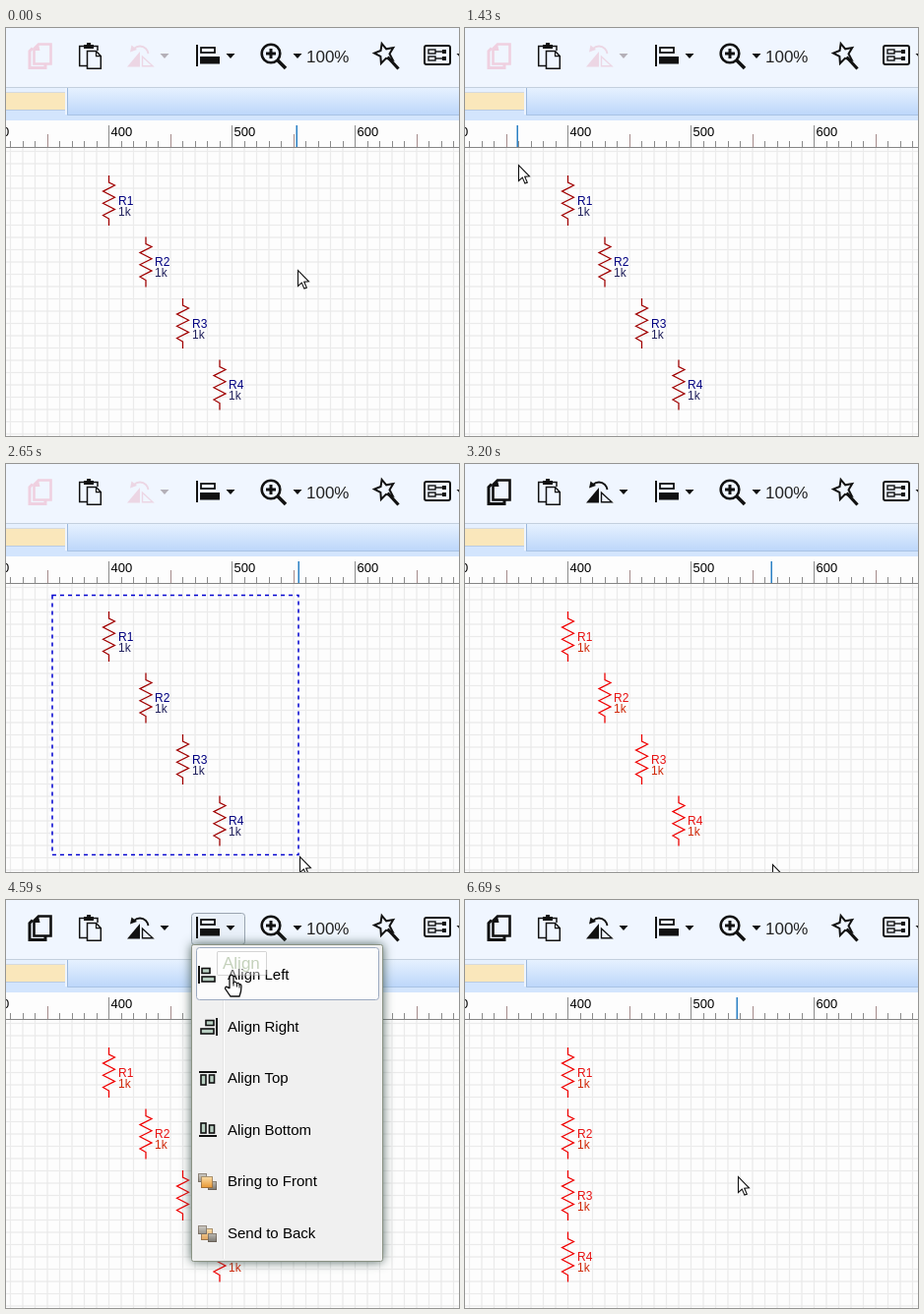
An HTML page with a canvas for the animation above (7.53 s loop, 460x415 px).

```html
<!DOCTYPE html>
<html lang="en">
<head>
<meta charset="utf-8">
<title>Aligning parts</title>
<style>
html, body { margin: 0; width: 100%; height: 100%; overflow: hidden; background: #fff; }
canvas { display: block; width: 460px; height: 415px; }
</style>
</head>
<body>
<canvas id="stage" width="460" height="415"></canvas>
<script>
const ctx = document.getElementById('stage').getContext('2d');
const LOOP = 7530, GRID = 12.5, ORIGIN = 104.5;
const SANS = '"Liberation Sans", Arial, sans-serif';

const SELECT = 3110, HOVER = 3970, OPEN = 4040, LEAVE = 4440, ALIGN = 5290;

const linear = u => u;
const smooth = u => u * u * (3 - 2 * u);
const out = p => u => 1 - (1 - u) ** p;

// Pointer moves: first step, last step, step count, target x and y, easing per axis
const moves = [
  [670, 1350, 10, 59, 143, smooth],
  [1430, 1510, 2, 48, 135, linear],
  [1660, 2340, 10, 242, 367, u => u * (0.8 + 0.2 * u)],
  [2420, 2800, 6, 312, 407, out(1.48)],
  [3430, 3970, 8, 216, 30, out(2), linear],
  [4440, 4740, 5, 230, 77, out(4)],
  [6300, 6690, 6, 277, 281, smooth]
];

function progress(t, start, end, n) {
  if (t < start) return 0;
  return Math.min(1, (Math.floor((t - start + 6) / (end - start) * (n - 1)) + 1) / n);
}

function pointerAt(t) {
  let x = 296, y = 246;
  for (const [start, end, n, tx, ty, easeX, easeY = easeX] of moves) {
    const u = progress(t, start, end, n);
    x += (tx - x) * easeX(u);
    y += (ty - y) * easeY(u);
  }
  return { x: Math.round(x), y: Math.round(y) };
}

function rect(x, y, w, h, color) {
  ctx.fillStyle = color;
  ctx.fillRect(x, y, w, h);
}

function frame(x, y, w, h, color, width = 1) {
  ctx.strokeStyle = color;
  ctx.lineWidth = width;
  ctx.strokeRect(x, y, w, h);
}

function path(points, { fill, stroke, width = 1, close = false }) {
  ctx.beginPath();
  points.forEach(([x, y]) => ctx.lineTo(x, y));
  if (close) ctx.closePath();
  if (fill) { ctx.fillStyle = fill; ctx.fill(); }
  if (stroke) { ctx.strokeStyle = stroke; ctx.lineWidth = width; ctx.stroke(); }
}

function box(x, y, w, h, r, fill, stroke) {
  ctx.beginPath();
  ctx.roundRect(x, y, w, h, r);
  ctx.fillStyle = fill;
  ctx.fill();
  ctx.shadowColor = 'transparent';
  ctx.strokeStyle = stroke;
  ctx.lineWidth = 1;
  ctx.stroke();
}

function text(s, x, y, size, color) {
  ctx.font = `${size}px ${SANS}`;
  ctx.fillStyle = color;
  ctx.fillText(s, x, y);
}

function fade(y0, y1, from, to) {
  const g = ctx.createLinearGradient(0, y0, 0, y1);
  g.addColorStop(0, from);
  g.addColorStop(1, to);
  return g;
}

function caret(x, color = '#111') {
  path([[x - 4.5, 26], [x + 4.5, 26], [x, 31]], { fill: color, close: true });
}

function copyIcon(color) {
  path([[27, 20.5], [24, 23.5], [24, 40.5], [40, 40.5], [40, 37]], { stroke: color, width: 3 });
  path([[33, 16.5], [45.5, 16.5], [45.5, 36.5], [28.5, 36.5], [28.5, 21]],
    { stroke: color, width: 2.6, close: true });
  path([[28.5, 21], [33, 16.5], [34.5, 23], [28.5, 23]], { fill: color, close: true });
}

function pasteIcon() {
  path([[82, 38.5], [74.7, 38.5], [74.7, 18.5], [93, 18.5], [93, 23]], { stroke: '#111', width: 1.5 });
  rect(79, 17, 10, 4, '#111');
  rect(82, 15, 4, 3, '#111');
  path([[82.5, 23.5], [91.5, 23.5], [96.3, 28.5], [96.3, 41.3], [82.5, 41.3]],
    { fill: '#f0f6ff', stroke: '#111', width: 1.5, close: true });
  path([[91.5, 24], [91.5, 28.7], [96, 28.7]], { stroke: '#111', width: 1.2 });
}

function rotateIcon(color) {
  path([[123, 39.5], [136, 39.5], [136, 24]], { fill: color, close: true });
  path([[138.5, 38.7], [138.5, 29], [149, 38.7]], { stroke: color, width: 1.4, close: true });
  ctx.beginPath();
  ctx.arc(136, 27, 8.5, -Math.PI * 0.75, -0.1);
  ctx.lineWidth = 1.8;
  ctx.stroke();
  path([[126, 24.5], [127.5, 17.5], [133, 22]], { fill: color, close: true });
}

function zoomIcon() {
  ctx.beginPath();
  ctx.arc(269, 26, 9.3, 0, Math.PI * 2);
  ctx.strokeStyle = '#111';
  ctx.lineWidth = 2.6;
  ctx.stroke();
  rect(264, 24.5, 10, 3, '#111');
  rect(267.5, 21, 3, 10, '#111');
  path([[276, 33], [284, 41]], { stroke: '#111', width: 3.6 });
}

function wandIcon() {
  const star = Array.from({ length: 10 }, (_, i) => {
    const a = -1.85 + i * Math.PI / 5, r = i % 2 ? 5 : 10.5;
    return [384.5 + r * Math.cos(a), 26 + r * Math.sin(a)];
  });
  path(star, { stroke: '#111', width: 2, close: true });
  path([[387.5, 29.5], [398.5, 41.5]], { stroke: '#111', width: 3.2 });
}

function boardIcon() {
  ctx.beginPath();
  ctx.roundRect(425, 18, 26, 19, 2);
  ctx.strokeStyle = '#111';
  ctx.lineWidth = 2;
  ctx.stroke();
  for (const y of [24, 31]) {
    frame(429, y - 2, 7, 4, '#111', 1.4);
    rect(436, y - .7, 8, 1.4, '#111');
    rect(443, y - 2, 4, 4, '#111');
  }
}

function toolbar(t) {
  const selected = t >= SELECT;
  rect(0, 0, 460, 60, '#f0f6ff');
  if (t >= HOVER && t < ALIGN) {
    const lit = t < LEAVE;
    box(188.5, 13.5, 54, 32, 3, lit ? '#d9e7f9' : '#e9f0f9', lit ? '#a9bfdd' : '#9aa5b0');
  }
  copyIcon(selected ? '#111' : '#efd0e0');
  pasteIcon();
  rotateIcon(selected ? '#111' : '#ecd6e4');
  caret(161, selected ? '#111' : '#b4b0b8');
  rect(193, 17, 2, 22, '#111');
  frame(198, 20, 14, 5, '#111', 1.8);
  rect(197, 29, 20, 7.5, '#111');
  caret(228);
  zoomIcon();
  caret(296);
  text('100%', 305, 35, 17, '#222');
  wandIcon();
  boardIcon();
  caret(462);
}

function tabs() {
  rect(0, 60, 460, 34, '#d3e5fd');
  rect(0, 61, 62, 5, '#e6f0fe');
  rect(0, 66, 60, 17, '#fae7bb');
  rect(0, 65, 60, 1, '#d5dae0');
  rect(0, 83, 60, 1, '#b9cbe2');
  rect(60, 61, 2, 27, '#eef5ff');
  rect(62, 61, 398, 27, fade(61, 88, '#e6f1ff', '#bdd7fa'));
  rect(0, 60, 460, 1, '#c4d0de');
  rect(62, 61, 1, 27, '#9db9dc');
  rect(62, 88, 398, 1, '#a9c3e4');
  rect(0, 94, 460, 1, '#9fb3cc');
}

function ruler(x, color) {
  rect(0, 94, 460, 28, '#fdfdfd');
  for (let i = -8; i <= 28; i++) {
    const major = i % 10 === 0, middle = i % 5 === 0;
    const top = major ? 99 : middle ? 108 : 115;
    rect(Math.floor(ORIGIN + i * GRID), top, 1, 121 - top, middle && !major ? '#a58c8c' : '#8c8c8c');
  }
  for (let n = 300; n <= 600; n += 100) text(n, 106.5 + (n - 400) * 1.25, 110, 13, '#000');
  rect(0, 121, 460, 1, '#858585');
  rect(x, 99, 1.5, 22, color);
}

function sheet() {
  const w = 1.25, color = '#ebebeb';
  rect(0, 122, 460, 293, '#fdfdfd');
  for (let x = ORIGIN - 8 * GRID; x < 460; x += GRID) rect(x - w / 2, 122, w, 293, color);
  for (let y = 125.5; y < 415; y += GRID) rect(0, y - w / 2, 460, w, color);
}

function resistor(i, t) {
  const selected = t >= SELECT;
  const x = ORIGIN + (t < ALIGN ? i * 37.5 : 0), y = 150 + i * 62.5;
  const zig = [[x, y], [x, y + 7]];
  for (let k = 0; k < 6; k++) zig.push([x + (k % 2 ? -6 : 6), y + 10 + k * 6.1]);
  zig.push([x, y + 44], [x, y + 51]);
  path(zig, { stroke: selected ? '#f00000' : '#a00000', width: 1.25 });
  const ink = selected ? '#e81010' : '#000080', tx = Math.round(x + 9);
  text('R' + (i + 1), tx, Math.floor(y + 30), 12, ink);
  text('1k', tx, Math.floor(y + 41), 12, selected ? '#d02808' : '#20205c');
}

function marquee(p) {
  ctx.setLineDash([4, 4]);
  frame(47, 133.5, p.x - 48, p.y - 135, '#0000d0', 1.5);
  ctx.setLineDash([]);
}

// Small alignment symbols, turned for each direction
function alignIcon(kind, cy) {
  ctx.save();
  ctx.translate(205, cy);
  if (kind === 1) ctx.scale(-1, 1);
  if (kind === 2) ctx.rotate(Math.PI / 2);
  if (kind === 3) ctx.transform(0, -1, -1, 0, 0, 0);
  if (kind > 1) ctx.translate(3, 0);
  rect(-10, -9, 2, 18, '#111');
  for (const [y, w, h] of [[-6.5, 8, 5], [2, kind > 1 ? 10 : 13, 5]]) {
    rect(-6, y, w, h, '#b9cfc2');
    frame(-6, y, w, h, '#111', 1.6);
  }
  ctx.restore();
}

function stackIcon(front, cy) {
  const tile = (x, y, s, from, to) => {
    rect(x, y, s, s, fade(y, y + s, from, to));
    frame(x + .5, y + .5, s - 1, s - 1, 'rgba(90,75,60,.5)');
  };
  const main = () => tile(198, cy - 5, 12, '#fbe0ac', front ? '#e8952f' : '#dfa25c');
  const sides = () => {
    tile(195, cy - 8, 9, '#d2cfc8', '#96938c');
    tile(205, cy, 9, '#c0bdb6', '#77746e');
  };
  (front ? [sides, main] : [main, sides]).forEach(layer => layer());
}

function menu(t) {
  ctx.save();
  ctx.shadowColor = '#3f5650';
  ctx.shadowBlur = 11;
  box(188.5, 45.5, 194, 322, 2, '#f0f0f0', '#8b9384');
  ctx.restore();
  rect(220, 49, 1, 316, '#e4e4e4');
  rect(221, 49, 1, 316, '#fff');
  if (t >= LEAVE) box(193.5, 48.5, 185, 53, 3, '#fcfcfc', '#9caac0');
  ['Align Left', 'Align Right', 'Align Top', 'Align Bottom', 'Bring to Front', 'Send to Back']
    .forEach((label, i) => {
      const y = 76 + i * 52.6;
      if (i < 4) alignIcon(i, Math.round(y));
      else stackIcon(i === 4, Math.round(y));
      text(label, 225, Math.round(y + 5), 15, '#000');
    });
  const alpha = 1 - progress(t, 4440, 4740, 5);
  if (alpha > 0) {
    ctx.save();
    ctx.globalAlpha = alpha;
    box(214.5, 52.5, 50, 24, 1, '#fff', '#999');
    text('Align', 220, 70, 17, '#6f8f58');
    ctx.restore();
  }
}

function arrow({ x, y }) {
  const shape = [[0, 0], [0, 16], [3.8, 12.6], [6.4, 18.6], [8.8, 17.6], [6.2, 11.8], [11, 11.4]];
  path(shape.map(([a, b]) => [x + a + .5, y + b + .5]), { fill: '#fff', stroke: '#111', width: 1.1, close: true });
}

function hand({ x, y }) {
  ctx.save();
  ctx.translate(x - 1, y);
  ctx.beginPath();
  ctx.moveTo(-2, 14);
  ctx.lineTo(-2, 2);
  ctx.quadraticCurveTo(0, -1.5, 2, 2);
  ctx.lineTo(2, 8);
  ctx.quadraticCurveTo(4, 6, 5.5, 9);
  ctx.quadraticCurveTo(7.5, 7.5, 8, 10);
  ctx.quadraticCurveTo(10, 9, 10, 12);
  ctx.lineTo(9.5, 17);
  ctx.lineTo(8, 22);
  ctx.lineTo(-1, 22);
  ctx.lineTo(-6.5, 14);
  ctx.quadraticCurveTo(-6, 10.5, -2, 14);
  ctx.fillStyle = '#fff';
  ctx.fill();
  ctx.strokeStyle = '#111';
  ctx.lineWidth = 1.3;
  ctx.stroke();
  for (const [fx, fy] of [[2, 8], [5.5, 9], [8, 10]]) path([[fx, fy], [fx, fy + 3.5]], { stroke: '#111' });
  ctx.restore();
}

function clickSpot(t, p) {
  const shown = [[1660, 1735], [3110, 3200], [5060, 6300]].some(([a, b]) => t >= a && t < b);
  if (!shown) return;
  const at = t < 1800 ? { x: 48, y: 135 } : p;
  ctx.beginPath();
  ctx.arc(at.x - .5, at.y + .5, 12, 0, Math.PI * 2);
  ctx.fillStyle = 'rgba(204,232,80,.8)';
  ctx.fill();
}

function draw(t) {
  const p = pointerAt(t);
  const dragging = t >= 1735 && t < SELECT;
  const resting = t >= ALIGN && t < 6300;
  sheet();
  for (let i = 0; i < 4; i++) resistor(i, t);
  if (dragging) marquee(p);
  toolbar(t);
  tabs();
  ruler(p.y >= 100 ? p.x - 1.5 : 224, resting ? '#555' : '#2a80c4');
  if (t >= OPEN && t < ALIGN) menu(t);
  clickSpot(t, p);
  if (t >= HOVER && t < ALIGN) hand(p);
  else arrow(p);
}

const begin = performance.now();
function tick() {
  draw((performance.now() - begin) % LOOP);
  requestAnimationFrame(tick);
}
tick();
</script>
</body>
</html>
```
